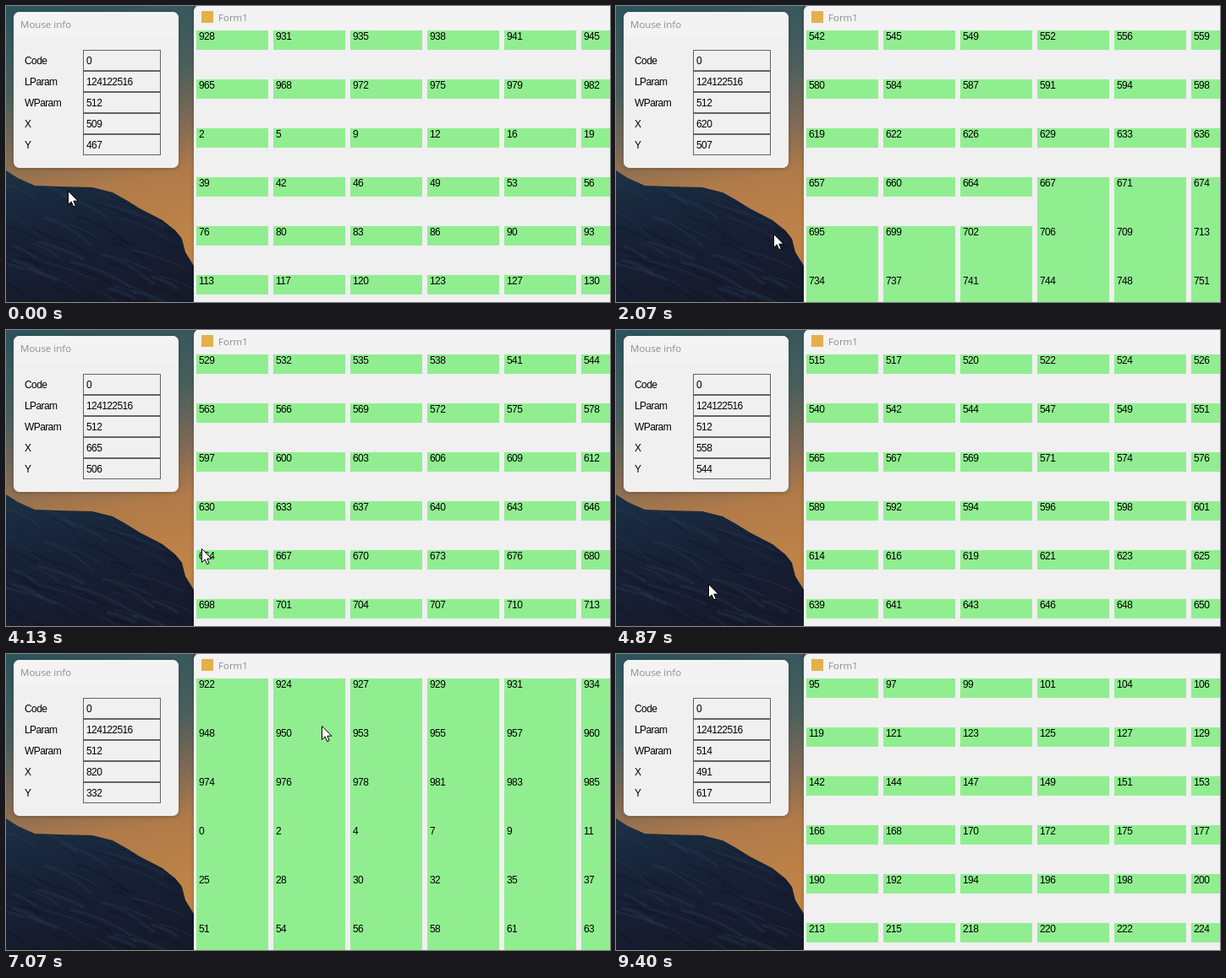
An HTML page for the animation above (9470 ms loop, 714 px wide and 351 px high).

```html
<!DOCTYPE html>
<html lang="en">
<head>
<meta charset="utf-8">
<title>Mouse info</title>
<style>
html, body { margin: 0; width: 100%; height: 100%; overflow: hidden; }
#stage { position: relative; width: 714px; height: 351px; overflow: hidden; background: #2b535c;
  font: 12px "Liberation Sans", Arial, sans-serif; letter-spacing: -.6px; color: #000; }
#stage > *, .win > * { position: absolute; box-sizing: border-box; white-space: nowrap; }
.win { background: #f0f0f0; overflow: hidden; box-shadow: 0 1px 5px rgba(0,0,0,.22); }
#info { left: 9px; top: 7px; width: 195px; height: 185px; border-radius: 7px; }
#form { left: 222px; top: -1px; width: 500px; height: 360px; border-radius: 8px 0 0 0; }
.bar { left: 0; top: 0; width: 100%; background: #f3f3f3; color: #8c8c8c;
  font: 11.5px/29px "Open Sans", "Noto Sans", sans-serif; letter-spacing: 0; }
#info .bar { height: 31px; padding-left: 8px; }
#form .bar { height: 29px; padding-left: 29px; }
.icon { left: 9px; top: 7px; width: 14px; height: 14px; background: #e3b04b; }
.label { left: 13px; line-height: 24px; }
.field { left: 82px; width: 92px; height: 25px; border: 1px solid #646464;
  padding-left: 3px; line-height: 24px; }
.cell { width: 85px; padding-left: 3px; line-height: 14px; background: #90ee90; }
</style>
</head>
<body>
<div id="stage">
  <svg width="222" height="351" viewBox="0 0 222 351">
    <defs>
      <linearGradient id="sky" x1="0" y1="0" x2=".12" y2="1">
        <stop offset="0" stop-color="#2b535c"/>
        <stop offset=".3" stop-color="#4a5f5d"/>
        <stop offset=".5" stop-color="#806a55"/>
        <stop offset=".66" stop-color="#b07a49"/>
        <stop offset=".9" stop-color="#c08446"/>
      </linearGradient>
      <linearGradient id="stone" x1="0" y1="0" x2=".3" y2="1">
        <stop offset="0" stop-color="#1b3144"/>
        <stop offset=".5" stop-color="#172136"/>
        <stop offset="1" stop-color="#161b2c"/>
      </linearGradient>
      <clipPath id="edge"><use href="#rock"/></clipPath>
    </defs>
    <rect width="222" height="351" fill="url(#sky)"/>
    <path id="rock" fill="url(#stone)" d="M0 195L14 204L34 213L62 214L102 215L126 221
      L142 230L158 240L185 254L200 266L208 276L212 292L222 308V351H0Z"/>
    <g id="streaks" clip-path="url(#edge)" fill="none"/>
  </svg>
  <div id="form" class="win"><div class="bar">Form1</div><div class="icon"></div></div>
  <div id="info" class="win"><div class="bar">Mouse info</div></div>
  <svg id="cursor" width="14" height="21" viewBox="0 0 14 21" style="left:-1px;top:0">
    <path d="M.5 .5V16.6L4.2 13.1L6.7 18.8L9.2 17.7L6.8 12.2H12Z" fill="#fff" stroke="#000"/>
  </svg>
</div>
<script>
const LOOP = 9470, LAST = 141, COLS = 6, ROWS = 6;
const STRIDE = 11;      // columns in a full row, most of them beyond the right edge
const PASS_STEPS = 6.97, PASS_SHIFT = 4.75, LAST_PASS = 20;
const $ = id => document.getElementById(id);

function add(parent, cls, style, text = '') {
  const el = document.createElement('div');
  el.className = cls;
  el.textContent = text;
  Object.assign(el.style, style);
  parent.append(el);
  return el;
}

const fields = ['Code', 'LParam', 'WParam', 'X', 'Y'].map((name, i) => {
  add($('info'), 'label', { top: 46 + 25 * i + 'px' }, name);
  return add($('info'), 'field', { top: 45 + 25 * i + 'px' });
});
fields[0].textContent = '0';
fields[1].textContent = '124122516';

const cells = Array.from({ length: ROWS * COLS }, (_, i) => add($('form'), 'cell', {
  left: 3 + 91 * (i % COLS) + 'px',
  top: 30 + 58 * Math.floor(i / COLS) + 'px'
}));

// Rock texture
let seed = 7;
const rnd = () => (seed = seed * 16807 % 2147483647) / 2147483647;
for (let i = 0; i < 70; i++) {
  const x = rnd() * 230 - 40, y = 200 + rnd() * 150, len = 25 + rnd() * 50;
  const p = document.createElementNS('http://www.w3.org/2000/svg', 'path');
  p.setAttribute('d', `M${x} ${y}q${len / 2} ${len * .1} ${len} ${len * (.3 + rnd() * .3)}`);
  p.setAttribute('stroke', i % 2 ? '#101626' : '#26394e');
  p.setAttribute('stroke-width', 1 + rnd() * 3);
  p.setAttribute('opacity', .4);
  $('streaks').append(p);
}

// Repaint passes follow each other at an even pace
const passStart = p => Math.floor(p * PASS_STEPS - PASS_SHIFT);
const passAt = k => Math.min(LAST_PASS, Math.ceil((k + 1 + PASS_SHIFT) / PASS_STEPS) - 1);

// Key points: swings done, pointer tip, reported position, first and last clock stamp
const keys = [
  { k: 0, turns: -.11, tip: [74, 219], pos: [509, 467], span: [928, 1130] },
  { k: 31, turns: 1.76, tip: [187, 270], pos: [620, 507], span: [2542, 2751] },
  { k: 52, turns: 3.5, tip: [348, 219], pos: [768, 469], span: [4036, 4245] },
  { k: 73, turns: 5.16, tip: [110, 301], pos: [558, 544], span: [5515, 5650] },
  { k: 106, turns: 7.5, tip: [374, 85], pos: [820, 332], span: [7922, 8063] },
  { k: 125, turns: 8.24, tip: [169, 242], pos: [586, 489], span: [8914, 9101] },
  { k: 141, turns: 9.92, tip: [57, 371], pos: [491, 617], span: [10095, 10224] }
];
for (const key of keys) key.pass = passAt(key.k);

// Value of pick(key), linear between the keys along the given axis
function mix(axis, v, pick) {
  let i = 0;
  while (i < keys.length - 2 && keys[i + 1][axis] <= v) i++;
  const a = keys[i], b = keys[i + 1], u = (v - a[axis]) / (b[axis] - a[axis]);
  return pick(a) + (pick(b) - pick(a)) * u;
}

// The hand swings between lower left and upper right, drifting a little
const swing = (turns, axis) => {
  const c = Math.cos(turns * 2 * Math.PI);
  return axis ? 195 + 75 * c : 200 - 165 * c;
};
const pointer = (k, axis) => swing(mix('k', k, q => q.turns), axis) +
  mix('k', k, q => q.tip[axis] - swing(q.turns, axis));

function stamp(pass, row, col) {
  const first = mix('pass', pass, q => q.span[0]);
  const last = mix('pass', pass, q => q.span[1]);
  const done = (row * STRIDE + col) / ((ROWS - 1) * STRIDE + COLS - 1);
  return Math.round(first + (last - first) * done) % 1000;
}

function draw(k) {
  const tip = [0, 1].map(axis => pointer(k, axis));
  $('cursor').style.transform = `translate(${tip.map(v => Math.round(v) + 'px')})`;
  fields[2].textContent = 512 + Math.max(0, k - LAST + 2);
  tip.forEach((v, axis) => {
    fields[3 + axis].textContent = Math.round(v + mix('k', k, q => q.pos[axis] - q.tip[axis]));
  });

  // Cells come up tall, then get trimmed from the top down
  const pass = passAt(k), age = k - passStart(pass);
  const trimmed = age > 1 ? cells.length : age * (pass % 2 ? 21 : 30);
  cells.forEach((cell, i) => {
    cell.textContent = stamp(pass, Math.floor(i / COLS), i % COLS);
    cell.style.height = i < trimmed ? '23px' : '58px';
  });
}

const timeOf = k => Math.round(k * 20 / 3) * 10;
const begin = performance.now();
let shown = -1;
function tick() {
  const t = (performance.now() - begin) % LOOP;
  let k = Math.min(LAST, Math.round(t * 3 / 200));
  if (timeOf(k) > t) k--;
  if (k !== shown) draw(shown = k);
  requestAnimationFrame(tick);
}
tick();
</script>
</body>
</html>
```
